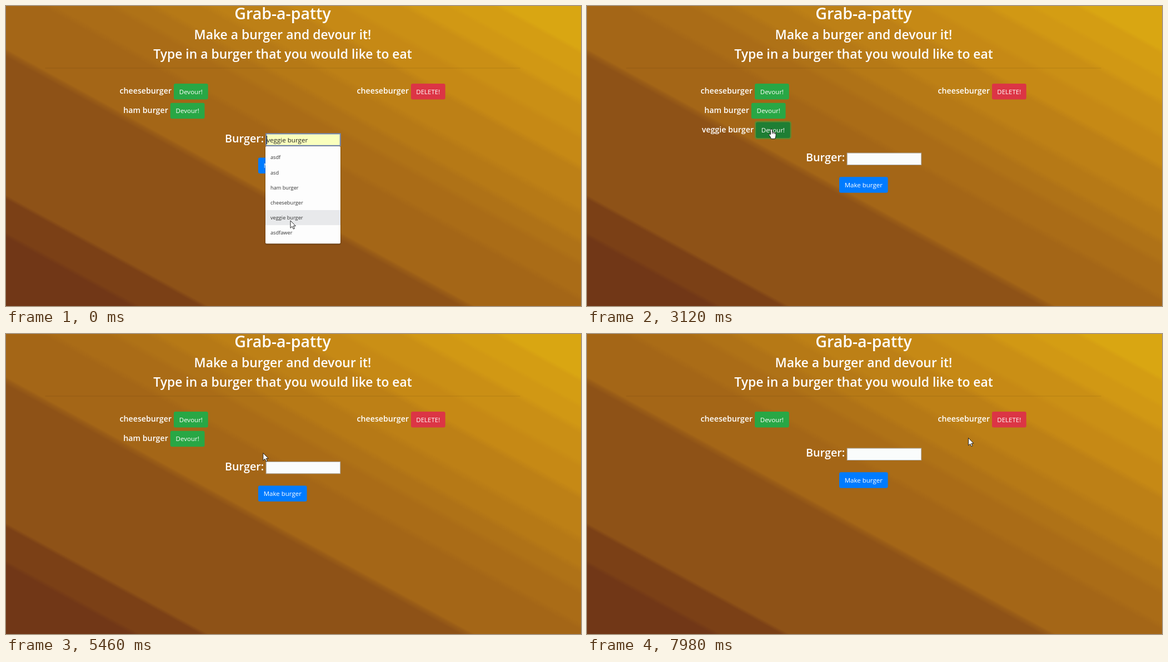
An HTML page that plays this animation: 1035 by 541 pixels, repeating every 8.04 s.

```html
<!DOCTYPE html>
<html lang="en">
<head>
<meta charset="utf-8">
<title>Burger list</title>
<style>
  html, body { margin: 0; width: 100%; height: 100%; overflow: hidden; }
  body {
    background: linear-gradient(208.8deg,
      #d9a612 68px, #d49d13 76px 110px, #d19814 118px 146px,
      #ca8f15 158px 200px, #c68915 212px 250px, #bd8016 262px 318px,
      #b67916 332px 366px, #af7217 378px 400px, #aa6c17 412px 456px,
      #a46617 468px 566px, #995c17 571px, #8e5217 579px 797px,
      #7b4016 804px 856px, #713717 864px);
  }
  svg { display: block; width: 100vw; height: 100vh; }
  text { font-family: "Open Sans", "Noto Sans", sans-serif; fill: #fff; }
  .title { font-size: 28.5px; font-weight: 600; }
  .lead { font-size: 22.9px; font-weight: 600; }
  .label { font-size: 14.2px; font-weight: 600; }
  .field { font-size: 19.8px; font-weight: 600; }
  .btn { font-size: 11.5px; }
  .value { font-size: 11.6px; fill: #222; }
  .option { font-size: 9.2px; fill: #333; }
  .center { text-anchor: middle; }
  .end { text-anchor: end; }
  #menu { filter: drop-shadow(0 1px 1px rgba(0, 0, 0, .45)); }
  #arrow, #hand { fill: #fff; stroke: #111; stroke-width: .9; stroke-linejoin: round; }
</style>
</head>
<body>
<svg id="stage" viewBox="0 0 1035 541">
  <text class="title center" x="498" y="24">Grab-a-patty</text>
  <text class="lead center" x="498" y="60">Make a burger and devour it!</text>
  <text class="lead center" x="498" y="95">Type in a burger that you would like to eat</text>
  <rect x="70.5" y="111.5" width="855" height="1" fill="#000" opacity=".1"/>
  <g id="rows"></g>
  <g id="form">
    <text class="field end" x="464.3" y="245.6">Burger:</text>
    <rect id="input" x="468.2" y="230.4" width="133.5" height="21.4"/>
    <text id="value" class="value" x="469.3" y="245.6">veggie burger</text>
    <rect id="caret" x="469" y="234" width="1" height="15" fill="#000"/>
  </g>
  <g id="menu"></g>
  <g id="cursor">
    <path id="arrow" d="M0 0V13.4L3.2 10.5 5.3 15.2 7.4 14.3 5.4 9.7H9.4Z"/>
    <g id="hand">
      <path d="M-1.5 9.8V1.4A1.5 1.5 0 0 1 1.5 1.4V5.4Q3.4 4.6 4 6 5.9 5.3 6.3 6.8 8 6.6 8 8.2V11.5Q8 14 6.3 17.4H-.4Q-1.6 14-4.2 11-5 9.3-3.2 8.9-2.2 9-1.5 9.8Z"/>
      <path d="M1.5 5.4V8.6M4 6V8.8M6.3 6.8V9" fill="none"/>
    </g>
  </g>
</svg>
<script>
const LOOP = 8040, STEP = 60;
const $ = id => document.getElementById(id);
const show = (el, on) => { el.style.display = on ? '' : 'none'; };
const clamp = v => Math.max(0, Math.min(1, v));

const COLORS = {
  green: ['#28a745', '#1e7e34'],
  red: ['#dc3545', '#c82333'],
  blue: ['#007bff', '#0069d9']
};

// Times in ms: hover starts, mouse click, page reload.
const PRESSES = {
  make: [420, 600, 1200],
  eatVeggie: [2100, 2940, 3240],
  deleteVeggie: [4080, 4740, 4980],
  eatHam: [5640, 6000, 6300],
  deleteHam: [6900, 7380, 7680]
};

// id, label, button x, button y, colour, appears, disappears
const ROWS = [
  ['eatCheese', 'cheeseburger', 302, 140, 'green', 0, LOOP],
  ['eatHam', 'ham burger', 295.8, 174.8, 'green', 0, 6300],
  ['eatVeggie', 'veggie burger', 304, 209.5, 'green', 1200, 3240],
  ['deleteCheese', 'cheeseburger', 729, 140, 'red', 0, LOOP],
  ['deleteVeggie', 'veggie burger', 730.5, 174.8, 'red', 3240, 4980],
  ['deleteHam', 'ham burger', 722.5, 174.8, 'red', 6300, 7680]
];

// start, end, target x, target y, downward bow
const MOVES = [
  [180, 420, 501, 296, 0],
  [600, 900, 499, 300.5, 0],
  [1620, 2400, 332, 222, 0],
  [3420, 4200, 758.5, 201, 5],
  [5220, 5820, 307, 191.5, 22.5],
  [6540, 7020, 750, 180, 25],
  [7980, 7980, 686.5, 187.5, 0]
];

// The hand stays after a reload until the mouse moves again.
const HAND_TIMES = [[420, 1620], [2100, 3420], [4080, 5220], [5640, 6540], [6900, 7980]];

function button(id, x, y, w, text, color) {
  const fill = COLORS[color][0];
  return `<g class="btn">
    <rect id="${id}Ring" x="${x - 2.2}" y="${y - 2.2}" width="${w + 4.4}" height="32.9" rx="4.5" fill="${fill}" opacity="0"/>
    <rect id="${id}Face" x="${x}" y="${y}" width="${w}" height="28.5" rx="3" fill="${fill}"/>
    <text class="center" x="${x + w / 2}" y="${y + 18.6}">${text}</text></g>`;
}

$('rows').innerHTML = ROWS.map(([id, label, x, y, color]) => `<g id="${id}">
  <text class="label end" x="${x - 4}" y="${y + 18}">${label}</text>
  ${button(id, x, y, 61.7, color === 'green' ? 'Devour!' : 'DELETE!', color)}</g>`).join('');

$('form').insertAdjacentHTML('beforeend', button('make', 454, 273.6, 87.6, 'Make burger', 'blue'));

const options = ['asdf', 'asd', 'ham burger', 'cheeseburger', 'veggie burger', 'asdfawer'];
$('menu').innerHTML = `<rect x="467" y="253" width="135" height="175.5" rx="2" fill="#fdfdfd"/>
  <rect x="467" y="368" width="135" height="27.2" fill="#e8e9eb"/>` +
  options.map((name, i) => `<text class="option" x="476" y="${276.3 + i * 27.2}">${name}</text>`).join('');

function cursorAt(t) {
  let x = 512, y = 387;
  for (const [start, end, toX, toY, bow] of MOVES) {
    if (t < start) break;
    const p = clamp((t - start + STEP) / (end - start + STEP));
    const s = Math.sin(p * Math.PI / 2);
    x += (toX - x) * s;
    y += (toY - y) * s + bow * Math.sin(Math.PI * s);
  }
  return [x, y];
}

function paintButton(id, color, t) {
  const [hover, click, reload] = PRESSES[id];
  const fade = from => t < from || t >= reload ? 0 : clamp((t - from + STEP) / 180);
  const [base, dark] = COLORS[color];
  $(id + 'Face').style.fill = `color-mix(in srgb, ${dark} ${fade(hover) * 100}%, ${base})`;
  $(id + 'Ring').style.opacity = fade(click) * .5;
}

function draw(t) {
  for (const [id, , , , color, from, to] of ROWS) {
    show($(id), t >= from && t < to);
    if (PRESSES[id]) paintButton(id, color, t);
  }
  paintButton('make', 'blue', t);

  const shift = t >= 7680 ? -24.3 : t >= 1200 && t < 3240 ? 34.7 : 0;
  $('form').setAttribute('transform', `translate(0 ${shift})`);

  const filled = t < 1200, focused = t < 600;
  const input = $('input').style;
  input.fill = filled ? '#faffbd' : '#fafcfc';
  input.stroke = focused ? '#7189b8' : '#aaa8a4';
  input.strokeWidth = focused ? 2 : 1;
  show($('value'), filled);
  show($('caret'), t < 180);
  show($('menu'), t < 180);

  const [x, y] = cursorAt(t);
  const hand = HAND_TIMES.some(([from, to]) => t >= from && t < to);
  $('cursor').setAttribute('transform', `translate(${x} ${y})`);
  show($('hand'), hand);
  show($('arrow'), !hand);
}

const began = performance.now();
function tick() {
  const t = (performance.now() - began) % LOOP;
  draw(Math.floor(t / STEP) * STEP);
  requestAnimationFrame(tick);
}
tick();
</script>
</body>
</html>
```
